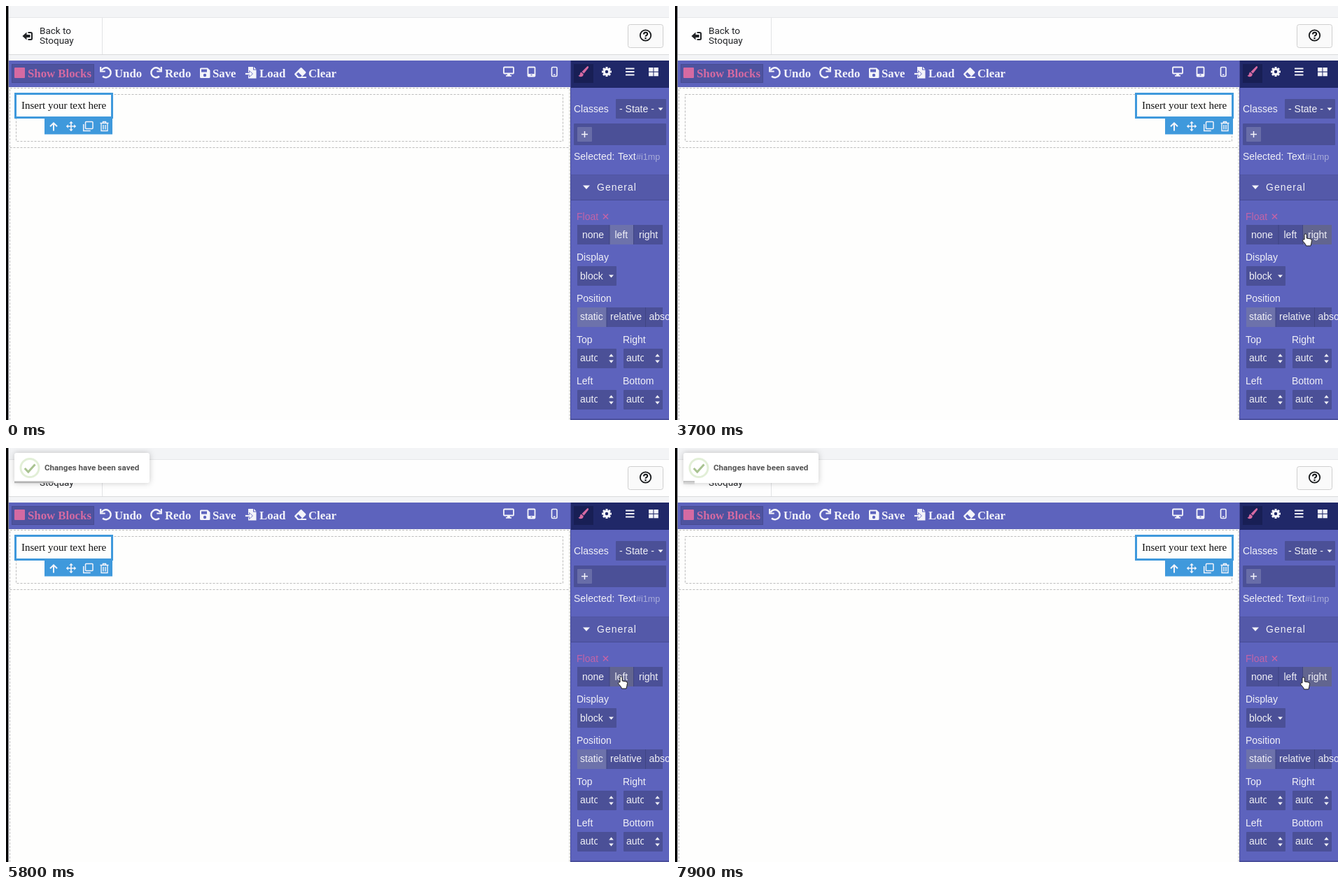
These frames come from a looping animation (947x592 px, 8000 ms). An HTML page:

```html
<!DOCTYPE html>
<html lang="en">
<head>
<meta charset="utf-8">
<title>Page builder</title>
<style>
  html, body { margin: 0; width: 100%; height: 100%; overflow: hidden; background: #fefefd; }
  svg { display: block; }
  text { white-space: pre; }
  .ui { font: 14px "Liberation Sans", Arial, sans-serif; fill: #f1f1f7; }
  .tool { font: bold 16.8px "Liberation Serif", "Times New Roman", serif; fill: #f4f4fa; }
  .body { font: 15px "Liberation Serif", "Times New Roman", serif; fill: #111; }
  .nav { font: 13.5px Roboto, sans-serif; fill: #212326; }
  .note { font: bold 11.6px Roboto, sans-serif; fill: #545454; }
  .line { fill: none; stroke: #f4f4fa; stroke-width: 2; }
  .dash { fill: none; stroke: #bcbcbc; stroke-dasharray: 3 2; }
  #toast { transform-origin: 108.5px 28.5px; }
  #bar { transform-origin: 12px 48px; }
  #card { filter: drop-shadow(0 0 4px rgba(0, 0, 0, .22)); }
</style>
</head>
<body>
<svg id="stage" width="947" height="592" viewBox="0 0 947 592"></svg>
<script>
const INK = '#f4f4fa', PINK = '#d56aa2', BLUE = '#3f99dc';
const PANEL = '#5d63bd', FIELD = '#4b5097', PICKED = '#6d72ab';

const rect = (x, y, w, h, fill, extra = '') =>
  `<rect x="${x}" y="${y}" width="${w}" height="${h}" fill="${fill}" ${extra}/>`;
const text = (x, y, str, cls = 'ui', extra = '') =>
  `<text x="${x}" y="${y}" class="${cls}" ${extra}>${str}</text>`;
const path = (d, fill = INK, extra = '') => `<path d="${d}" fill="${fill}" ${extra}/>`;
const line = (d, extra = '') => `<path d="${d}" class="line" ${extra}/>`;
const caret = (x, y, half, h) => path(`M${x - half} ${y}h${2 * half}l${-half} ${h}z`);

const header = () =>
  rect(0, 0, 947, 79, '#f3f4f6') + rect(4, 16, 943, 54, '#fefefe') +
  rect(4, 16, 943, 1, '#e6e7e9') + rect(4, 69, 943, 1, '#d9dadc') + rect(137, 17, 1, 52, '#e2e3e5') +
  path('M23.500 43l6-5.500v3.500h5v4h-5v3.500z', '#212326') +
  line('M31.500 38h4q1.500 0 1.500 1.500v7q0 1.500-1.500 1.500h-4', 'style="stroke:#212326"') +
  text(48, 40, 'Back to', 'nav') + text(48, 54, 'Stoquay', 'nav') +
  rect(888.5, 26.5, 50, 33, '#fafafa', 'rx="3" stroke="#cfcfcf"') +
  '<circle cx="913.500" cy="42" r="7.700" fill="none" stroke="#17191b" stroke-width="1.800"/>' +
  line('M911 40.500q0-2.700 2.600-2.700t2.600 2.300q0 1.300-1.500 2-1.200.600-1.200 1.700', 'style="stroke:#17191b"') +
  rect(912.4, 45, 2.2, 2.2, '#17191b');

const toolbar = () =>
  rect(4, 78, 803, 38, PANEL) + rect(4, 115, 803, 1, '#5a60b6') +
  rect(8.5, 83.5, 117, 26, '#4e539f', 'stroke="#464b91"') +
  rect(12, 88, 15, 15, PINK, 'rx="1"') +
  text(31, 102, 'Show Blocks', 'tool', `style="fill:${PINK}"`) +
  line('M136.500 92a7 7 0 1 1 1.500 8.500', 'style="stroke-width:2.400"') +
  line('M135.200 87v6.500h6.500', 'style="stroke-width:2.200"') + text(155, 102, 'Undo', 'tool') +
  line('M220.500 92a7 7 0 1 0-1.500 8.500', 'style="stroke-width:2.400"') +
  line('M221.800 87v6.500h-6.500', 'style="stroke-width:2.200"') + text(227, 102, 'Redo', 'tool') +
  path('M278.500 88.500h9.500l3.500 3.500v9.500q0 1.500-1.500 1.500h-11.500q-1.500 0-1.500-1.500v-11.500q0-1.500 1.500-1.500z') +
  rect(279, 90.5, 8, 4, PANEL) + `<circle cx="284" cy="99" r="2.200" fill="${PANEL}"/>` +
  text(295, 102, 'Save', 'tool') +
  path('M346 87h7v4.500h4.500v12h-11.500z') + path('M354 87l3.500 3.500h-3.500z') +
  path('M341.500 95.500h6v-3l5 4.500-5 4.500v-3h-6z', INK, `stroke="${PANEL}" stroke-width=".800"`) +
  text(362, 102, 'Load', 'tool') +
  path('M412.500 96.500l8-8q1-1 2 0l5.500 5.500q1 1 0 2l-5 5h6v2h-12.500l-4-4.500q-1-1 0-2z') +
  path('M414.800 97.500l2.800-2.800 5 5-1.500 1.500h-3z', PANEL) +
  text(432, 102, 'Clear', 'tool') +
  rect(711, 87.5, 14, 9, 'none', `rx="1" stroke="${INK}" stroke-width="1.800"`) +
  rect(716, 97, 4, 2.5, INK) + rect(714, 99, 8, 1.7, INK) +
  rect(745.5, 87.5, 10, 13, 'none', `rx="1" stroke="${INK}" stroke-width="1.800"`) + rect(745, 97, 11, 3, INK) +
  rect(749.5, 98, 2, 1.2, PANEL) +
  rect(779.5, 87.5, 7.5, 13, 'none', `rx="1.500" stroke="${INK}" stroke-width="1.600"`) + rect(782, 97.5, 2.5, 1.5, INK);

const canvas = () =>
  rect(4, 116, 802, 476, '#fefefd') +
  `<path class="dash" d="M5.500 592V117.500H805V592M5.500 202.500H805"/>` +
  '<rect class="dash" x="14.500" y="126.500" width="781" height="67"/>';

const selection = () =>
  rect(13.5, 125.5, 138, 34, '#fefefd', `stroke="${BLUE}" stroke-width="3"`) +
  text(22, 147, 'Insert your text here', 'body') +
  rect(55, 160, 97, 23.5, BLUE) +
  line('M68 178.500v-11M63 172.300l5-5 5 5') +
  line('M87.500 172h11M93 166.500v11', 'style="stroke-width:1.600"') +
  path('M93 164.800l2.800 3h-5.600zM93 179.200l2.800-3h-5.600zM85.800 172l3-2.800v5.600zM100.200 172l-3-2.800v5.600z') +
  rect(113.5, 165.5, 10.5, 10, 'none', `rx="1" stroke="${INK}" stroke-width="1.500"`) +
  line('M110.700 169v9.500h10', 'style="stroke-width:1.500"') +
  line('M134.500 167.500h12M138.500 167v-1.500h4v1.500M136 168v10.500h9v-10.500M139 170v6.500M142 170v6.500', 'style="stroke-width:1.400"');

const spinner = (x, y, label) =>
  text(x - 1, y - 8, label) + rect(x, y, 56, 28, FIELD, 'rx="1"') + text(x + 4, y + 18, 'auto') +
  rect(x + 29, y + 4, 12, 20, FIELD) + caret(x + 48.5, y + 11.5, 3.3, -4) + caret(x + 48.5, y + 16.5, 3.3, 4);

const gear = () => {
  const teeth = Array.from({ length: 8 }, (_, i) =>
    rect(856.5, 87, 3, 4, INK, `transform="rotate(${i * 45} 858 94)"`)).join('');
  return teeth + `<circle cx="858" cy="94" r="3.700" fill="none" stroke="${INK}" stroke-width="3"/>`;
};

const tabs = () =>
  rect(807, 78, 140, 39, '#202868') + rect(811, 83, 28, 27, '#181f55') +
  path('M831 86q2 1 .5 3l-6 7.500-3-2.500 6.500-6.500q1-1.300 2-1.500zM821.500 94.500l3.300 2.800q0 4-4.300 4-2 0-3-1.800 2.300 0 2.400-2.500.2-2 1.600-2.500z', PINK) +
  gear() + [88.5, 93, 97.5].map(y => rect(885, y, 12.5, 2, INK)).join('') +
  [88, 94.7].map(y => rect(918, y, 6.4, 5.6, INK) + rect(925.4, y, 6.4, 5.6, INK)).join('');

const sidebar = () =>
  rect(806, 78, 141, 514, PANEL) + rect(806, 78, 1, 514, '#484d99') + tabs() +
  text(811, 152, 'Classes') + rect(871, 133, 72, 28, FIELD, 'rx="1"') + text(876, 152, '- State -') +
  caret(935, 145.5, 3.5, 4) +
  rect(811, 168, 132, 31, FIELD, 'rx="1"') + rect(816, 173, 21, 21, '#686da8', 'rx="1"') +
  line('M822 183.500h9M826.500 179v9', 'style="stroke-width:1.500"') +
  text(811, 220, 'Selected:') + text(874, 220, 'Text') +
  text(900, 220, '#i1mp', 'ui', 'style="font-size:12.600px;fill:#a9acd9"') +
  rect(807, 241, 140, 36, '#5459a9') + rect(807, 241, 140, 1, '#5055a2') + rect(807, 277, 140, 1, '#474c95') +
  caret(829, 256.5, 5, 5.5) + text(844, 264, 'General', 'ui', 'style="letter-spacing:1px"') +
  text(815, 306, 'Float', 'ui', 'style="fill:#c264a7"') +
  line('M853 297.500l7 7M860 297.500l-7 7', 'style="stroke:#c264a7;stroke-width:1.600"') +
  rect(816, 313, 122, 28, '#3f4483') +
  floats.map(f => rect(f.x, 313, f.w, 28, FIELD, `id="${f.name}"`) + text(f.label, 332, f.name)).join('') +
  text(815, 364, 'Display') + rect(816, 372, 56, 28, FIELD, 'rx="1"') + text(820, 391, 'block') +
  caret(864.5, 384.5, 3.5, 4) +
  text(815, 423, 'Position') + rect(816, 431, 122, 28, '#3f4483') +
  rect(816, 431, 41.5, 28, PICKED) + rect(858.5, 431, 54.5, 28, FIELD) + rect(914, 431, 24, 28, FIELD) +
  text(820, 449, 'static') + text(863, 449, 'relative') + text(918.5, 449, 'absolute') +
  spinner(816, 490, 'Top') + spinner(882, 490, 'Right') +
  spinner(816, 549, 'Left') + spinner(882, 549, 'Bottom') + rect(807, 590, 140, 2, '#4b509c');

const toastMarkup = () =>
  rect(12, 7, 193, 43, '#fff', 'id="card" rx="3"') +
  '<circle cx="34" cy="28.500" r="13" fill="none" stroke="#e2efd7" stroke-width="3"/>' +
  '<path id="check" d="M26.800 29l5 5.200 9.700-10.700" fill="none" stroke="#a9c391" stroke-width="3" pathLength="1" stroke-dasharray="1 2"/>' +
  text(55, 32, 'Changes have been saved', 'note') +
  rect(12, 47.5, 193, 2.7, '#b3b3b3', 'id="bar"');

const floats = [
  { name: 'none', x: 816, w: 45.5, label: 823 },
  { name: 'left', x: 862.5, w: 33.5, label: 869.5 },
  { name: 'right', x: 897, w: 41, label: 904 },
];

const $ = id => document.getElementById(id);
$('stage').innerHTML = header() + toolbar() + canvas() +
  `<g id="selection">${selection()}</g>` + sidebar() +
  rect(0, 0, 3, 592, '#070707') + rect(3, 0, 1, 592, '#8c8c92') +
  `<g id="toast">${toastMarkup()}</g>
  <g id="cursor" stroke="#1a1a1a" stroke-linejoin="round">
    <path id="arrow" fill="#fff" d="M.500.500v15l3.500-3.300 2.300 5.200 2.300-1-2.300-5h4.800z"/>
    <path id="hand" fill="#fff" d="M3 9V2.500a1.600 1.600 0 0 1 3.200 0V7l5.500 1q2 .500 1.800 2.500l-.700 4-.800 3.500H5.500l-1-2.500-3.700-4.300q-.800-1.800.800-2.300z"/>
  </g>`;

const LOOP = 8000, STEP = 100, TIMER = 955, HIDE = 100, LAG = 24, FINGER = 4.5;

// time, x, y of the pointer
const route = [
  [1400, 100, 112], [1600, 125, 132], [1900, 165, 160], [2500, 165, 160],
  [2600, 230, 180], [2700, 480, 255], [2800, 745, 318], [2900, 838, 334],
  [3000, 856, 331], [3200, 896, 325], [4500, 896, 325], [4900, 874, 326],
  [5900, 874, 326], [6300, 932, 334], [6500, 913, 328], [6800, 913, 328],
  [7000, 899, 328], [7200, 899, 328], [7400, 893, 327],
];
const clicks = [[3700, 'right'], [5100, 'left'], [7000, 'right']];

function pointerAt(t) {
  const next = route.findIndex(p => p[0] > t);
  if (next < 0) return route.at(-1).slice(1);
  if (next === 0) return null;
  const [t0, x0, y0] = route[next - 1], [t1, x1, y1] = route[next];
  const k = (t - t0) / (t1 - t0);
  return [x0 + (x1 - x0) * k, y0 + (y1 - y0) * k];
}

const pose = transform => ({ transform, easing: 'ease' });
const motions = [
  $('toast').animate([
    pose('translateY(-10px) rotate(2deg)'), pose('translateY(0px) rotate(-2deg)'),
    pose('translateY(5px) rotate(2deg)'), pose('translateY(0px) rotate(0deg)'),
  ], { duration: 300 }),
  $('toast').animate([
    { opacity: 1, transform: 'rotate(0deg)' }, { opacity: 0, transform: 'rotate(1deg)' },
  ], { duration: HIDE, delay: TIMER }),
  $('bar').animate({ transform: ['scaleX(1)', 'scaleX(0)'] }, { duration: TIMER, fill: 'both' }),
  $('check').animate({ strokeDashoffset: [1.02, 0] }, { duration: 230, delay: 400, fill: 'both' }),
];
motions.forEach(m => m.pause());

const show = (id, on) => $(id).style.display = on ? '' : 'none';

function fillFor(picked, hovered) {
  if (picked) return hovered ? '#62658f' : PICKED;
  return hovered ? '#353a6e' : FIELD;
}

function render(t) {
  const [clickTime, side] = clicks.findLast(c => c[0] <= t) || [-Infinity, 'left'];
  $('selection').setAttribute('transform', `translate(${side === 'right' ? 645 : 0} 0)`);

  const pos = pointerAt(t);
  const onPanel = !!pos && pos[0] > 812;
  show('cursor', pos);
  show('arrow', !onPanel);
  show('hand', onPanel);
  if (pos) $('cursor').setAttribute('transform', `translate(${pos[0]} ${pos[1]})`);

  for (const f of floats) {
    const tip = onPanel ? pos[0] + FINGER : -1;
    $(f.name).setAttribute('fill', fillFor(f.name === side, tip >= f.x && tip < f.x + f.w + 1));
  }

  const age = t - clickTime - LAG;
  const alive = age >= 0 && age < TIMER + HIDE;
  show('toast', alive);
  if (alive) motions.forEach(m => m.currentTime = age);
}

const start = performance.now();
function tick() {
  const t = (performance.now() - start) % LOOP;
  render(Math.floor(t / STEP) * STEP);
  requestAnimationFrame(tick);
}
tick();
</script>
</body>
</html>
```
